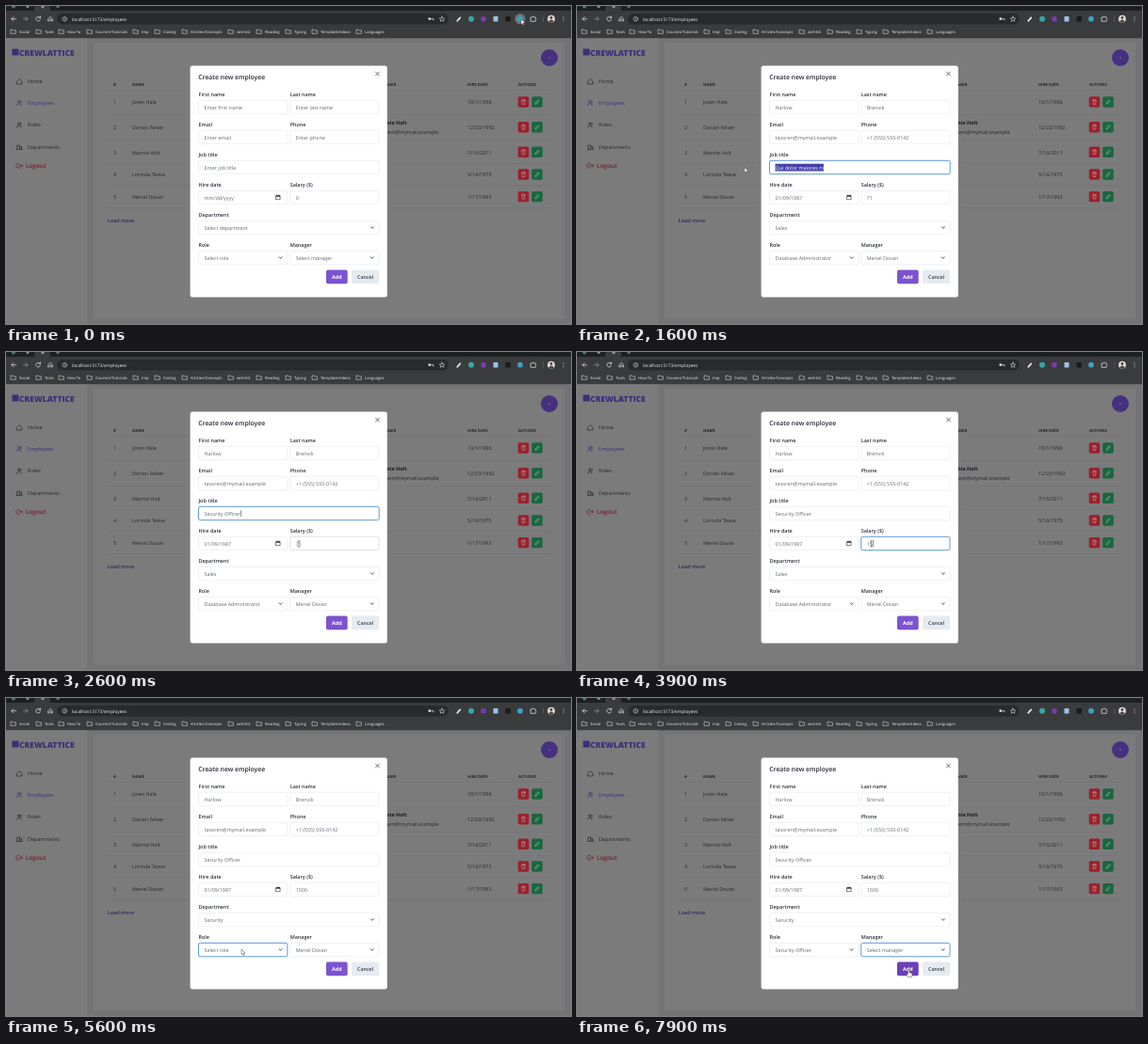
Animation, 600 px wide and 338 px high, one loop 8000 ms. Source, as an HTML page:

```html
<!DOCTYPE html>
<html lang="en">
<head>
<meta charset="utf-8">
<title>Create new employee</title>
<style>
  html, body { margin: 0; width: 100%; height: 100%; overflow: hidden; background: #777; }
  svg { display: block; width: 100vw; height: 100vh; }
  text { font-family: "Open Sans", "Noto Sans", sans-serif; text-rendering: geometricPrecision; white-space: pre; }
  .line { fill: none; stroke-linecap: round; stroke-linejoin: round; }
</style>
</head>
<body>
<svg id="stage" viewBox="0 0 600 338"></svg>
<script>
const stage = document.getElementById('stage');
const LOOP = 8000, STEP = 100;

function el(tag, attrs, parent = stage) {
  const node = document.createElementNS('http://www.w3.org/2000/svg', tag);
  for (const key in attrs) node.setAttribute(key, attrs[key]);
  return parent.appendChild(node);
}
const set = (node, attrs) => { for (const key in attrs) node.setAttribute(key, attrs[key]); };
const show = (node, on) => set(node, { visibility: on ? 'visible' : 'hidden' });
const box = (x, y, width, height, fill, rx = 0, parent) =>
  el('rect', { x, y, width, height, fill, rx }, parent);
const dot = (cx, cy, r, fill, parent) => el('circle', { cx, cy, r, fill }, parent);
const line = (d, stroke, width = 0.8, parent) =>
  el('path', { d, stroke, 'stroke-width': width, class: 'line' }, parent);
function label(x, y, str, size, fill, weight = 400, anchor = 'start', parent) {
  const node = el('text', { x, y, 'font-size': size, fill, 'font-weight': weight, 'text-anchor': anchor }, parent);
  node.textContent = str;
  return node;
}

// Browser bars
function drawBrowser() {
  const ink = '#d4d6d8';
  box(0, 0, 600, 6, '#1d2021');
  box(30, 0, 17, 6, '#3a3b3c', 2);
  dot(8, 0.5, 2, '#52777a');
  dot(23, 0.5, 1.6, '#8a9090');
  dot(39, 0.5, 1.6, '#989ba0');
  dot(55, 0.5, 1.6, '#6c7780');
  box(0, 5, 600, 29.5, '#3a3b3c');
  box(54, 8, 416, 11.5, '#282a2b', 5.7);
  line('M10.5 13.7H6M8 11.6L5.9 13.7 8 15.8', ink);
  line('M18.5 13.7H23M21 11.6L23.1 13.7 21 15.8', '#8b8e90');
  line('M36.3 12.4A2.4 2.4 0 1 0 36.4 14.6M36.6 10.9V12.7H34.8', ink);
  line('M45 13.4L47.2 11.3 49.4 13.4V16H48.1V14.1H46.3V16H45Z', ink, 0.7);
  el('circle', { cx: 62.3, cy: 13.8, r: 2.3, stroke: ink, 'stroke-width': 0.6, class: 'line' });
  line('M62.3 13.7V15M62.3 12.5V12.6', ink, 0.6);
  label(70, 15.6, 'localhost:5173/employees', 4.8, '#eceef0');
  dot(449.8, 13.7, 1.4, ink);
  line('M451 13.7H454V15', ink, 0.8);
  el('path', { d: 'M463 11L463.8 13 465.8 13.1 464.2 14.4 464.8 16.4 463 15.2 461.2 16.4 461.8 14.4 460.2 13.1 462.2 13Z',
    class: 'line', stroke: ink, 'stroke-width': 0.6 });
  line('M479.2 15.9L482.3 12.4', '#e8e8e8', 1.6);
  dot(494, 13.7, 3, '#35a8a4');
  dot(507, 13.7, 2.8, '#7d3bb0');
  box(517.5, 11, 5, 5.5, '#9cc3e6', 0.6);
  box(530.5, 11, 5.5, 5.5, '#191b1c', 0.6);
  const hover = dot(546, 13.7, 5.6, '#68757b');
  dot(546, 13.7, 2.9, '#3f9fc0');
  line('M557.5 12H559A1 1 0 0 1 561 12H562.3V13.4A1 1 0 0 1 562.3 15.2V16.3H557.5Z', ink, 0.8);
  box(570.2, 10.5, 0.5, 6.5, '#6c6e70');
  dot(579, 13.7, 3.9, '#e0dcd9');
  el('path', { d: 'M576.2 16.4Q579 12.8 581.8 16.4Q579 18.8 576.2 16.4Z', fill: '#4d4442' });
  dot(579, 12.5, 1.4, '#4d4442');
  for (const y of [11.7, 13.7, 15.7]) dot(592, y, 0.5, ink);

  const marks = [[14, 'Social'], [41, 'Tools'], [65, 'How To'], [95, 'Courses/Tutorials'], [144, 'Imp'],
    [167, 'Coding'], [196, 'Articles/Concepts'], [245, 'wishlist'], [275, 'Reading'], [306, 'Typing'],
    [334, 'Templates/Ideas'], [381, 'Languages']];
  for (const [x, name] of marks) {
    line(`M${x - 8.6} 25.1h1.7l.7 .8h2.6v3.4h-5z`, ink, 0.6);
    label(x, 28.8, name, 4.15, '#eceeef');
  }
  return hover;
}

// Dimmed page
function drawPage() {
  const ink = '#25282e', purple = '#3c2e76', red = '#7b1b2c';
  box(0, 34.5, 600, 303.5, '#747475');
  box(0, 34.5, 86, 303.5, '#7b7b7c');
  box(93, 39, 500, 293.5, '#7b7b7c', 2);
  box(6.5, 45.5, 7, 7, purple, 0.5);
  label(14, 52.6, 'CREWLATTICE', 8.5, purple, 800);

  line('M11.6 80.2L14.2 77.6 16.8 80.2V83H11.6Z', ink, 0.7);
  for (const [y, c] of [[103, purple], [126.5, ink]]) {
    el('circle', { cx: 13.7, cy: y - 1.4, r: 1.3, stroke: c, 'stroke-width': 0.7, class: 'line' });
    line(`M11.4 ${y + 2.6}Q11.6 ${y + 0.6} 13.7 ${y + 0.6}T16 ${y + 2.6}M16 ${y - 2}q1.4 .8 0 1.8`, c, 0.7);
  }
  line('M11.8 152.2V148H14.6V152.2M14.6 149.5H16.7V152.2M11.3 152.3H17.2', ink, 0.7);
  line('M13.8 167.4A2.5 2.5 0 1 0 13.8 172.2M13.3 169.8H17.3M16 168.4L17.4 169.8 16 171.2', red, 0.8);
  label(23, 82, 'Home', 5.5, ink);
  label(23, 105, 'Employees', 5.5, purple);
  label(23, 128.4, 'Roles', 5.5, ink);
  label(23, 151.7, 'Departments', 5.5, ink);
  label(21, 172.2, 'Logout', 6.4, red, 600);

  dot(577, 55, 9, '#46307f');
  line('M576.2 55H577.8M577 54.2V55.8', '#857ba5', 0.5);

  const heads = [[114, '#'], [134, 'NAME'], [490, 'HIRE DATE'], [544, 'ACTIONS']];
  for (const [x, name] of heads) label(x, 84.9, name, 4.3, ink, 700);
  label(414.3, 84.9, 'MANAGER', 4.3, ink, 700, 'end');
  const rows = [[102, 'Joren Hale', '10/1/1996'], [128.7, 'Dorian Felver', '12/23/1992'],
    [155.3, 'Marnie Holt', '7/16/2011'], [179, 'Lorinda Teave', '5/16/1975'], [202.6, 'Meriel Dovan', '1/17/1993']];
  rows.forEach(([y, name, date], i) => {
    label(114, y + 2.3, i + 1, 5.4, ink);
    label(134, y + 2.3, name, 5.4, ink);
    label(490, y + 2.3, date, 5.4, ink);
    box(543.7, y - 5.7, 11.6, 11.4, '#99222c', 1.6);
    box(558.2, y - 5.7, 11.6, 11.4, '#1b6640', 1.6);
    line(`M547.6 ${y - 1.6}h3.8M548.7 ${y - 2.5}h1.6M548 ${y - 1.5}l.3 4h2.4l.3 -4`, '#c9a0a4', 0.6);
    line(`M562.2 ${y + 2}l.3 -1.3 2.7 -2.8 1 1 -2.7 2.8z`, '#a0c0af', 0.6);
  });
  for (const y of [89.5, 115.3, 142, 167.2, 190.8, 214.5]) box(107, y, 472, 0.4, '#707071');
  label(425.5, 126, 'Marnie Holt', 5.4, '#17191d', 700, 'end');
  label(459.5, 135.8, 'lem@mymail.example', 5.4, ink, 400, 'end');
  label(107.7, 229.5, 'Load more', 5.5, '#30285a', 600);
}

const L = 204.5, R = 301.7, HALF = 94.3, FULL = 191.7;
const fields = {
  first: { x: L, y: 100.2, w: HALF, name: 'First name' },
  last: { x: R, y: 100.2, w: HALF, name: 'Last name' },
  email: { x: L, y: 132.2, w: HALF, name: 'Email' },
  phone: { x: R, y: 132.2, w: HALF, name: 'Phone' },
  job: { x: L, y: 164.3, w: FULL, name: 'Job title' },
  date: { x: L, y: 196.3, w: HALF, name: 'Hire date' },
  salary: { x: R, y: 196.3, w: HALF, name: 'Salary ($)' },
  dept: { x: L, y: 228.4, w: FULL, name: 'Department', opens: [4800, 5300],
    options: ['Select department', 'Administration', 'Engineering', 'Finance', 'Human Resources',
      'Legal', 'Marketing', 'Operations', 'Sales', 'Security'] },
  role: { x: L, y: 260.4, w: HALF, name: 'Role', opens: [5700, 6100], options: ['Select role', 'Security Officer'] },
  manager: { x: R, y: 260.4, w: HALF, name: 'Manager', opens: [6700, 7100],
    options: ['Select manager', 'Marnie Holt', 'Meriel Dovan'] }
};
const FIELD_H = 14.4, OPTION_H = 8, VALUE_INK = '#62676f';

function drawModal() {
  box(195.6, 63.6, 209.2, 246, '#fff', 2.5);
  label(204.3, 77.5, 'Create new employee', 6.8, '#23272f', 600);
  line('M392.5 70L396.5 74M396.5 70L392.5 74', '#30343b', 0.7);
  for (const f of Object.values(fields)) {
    label(f.x, f.y - 4.7, f.name, 5.45, '#2b2f37', 600);
    f.rect = box(f.x, f.y, f.w, FIELD_H, '#fff', 1.8);
    f.mark = box(0, f.y + 3.4, 0, 7.8, '#4440a8');
    f.text = label(f.x + 6, f.y + 9.4, '', 5.4, VALUE_INK);
    f.caret = box(0, f.y + 3.8, 0.5, 7, '#22252a');
    if (f.options) line(`M${f.x + f.w - 8.7} ${f.y + 6.4}l1.5 1.6 1.5 -1.6`, '#3f4650', 0.9);
  }
  line('M286.9 201.7H291.1V205.7H286.9ZM287.9 200.9V201.7M290.1 200.9V201.7', '#22252a', 0.6);
  box(286.9, 201.4, 4.2, 1.2, '#22252a');
  const add = box(340, 280.6, 22.7, 14.6, '#7c53d0', 1.8);
  label(351.3, 290, 'Add', 5.4, '#fff', 700, 'middle');
  box(367, 280.6, 29.2, 14.6, '#e6ebf0', 1.8);
  label(381.6, 290, 'Cancel', 5.4, '#333f50', 600, 'middle');
  return add;
}

function drawMenus() {
  for (const f of Object.values(fields).filter(f => f.options)) {
    const top = f.y + FIELD_H + 0.4;
    f.menu = el('g', {});
    set(box(f.x, top, f.w, f.options.length * OPTION_H, '#fff', 0, f.menu), { stroke: '#8b8f96', 'stroke-width': 0.5 });
    f.items = f.options.map((name, i) => ({
      y: top + i * OPTION_H,
      back: box(f.x, top + i * OPTION_H, f.w, OPTION_H, '#1967d2', 0, f.menu),
      text: label(f.x + 4, top + i * OPTION_H + 5.9, name, 5.4, '#555', 400, 'start', f.menu)
    }));
  }
}

function drawCursors() {
  const skin = { fill: '#fff', stroke: '#333', 'stroke-width': 0.45 };
  const arrow = el('path', { d: 'M0 0V5.6L1.4 4.4 2.3 6.5 3.2 6.1 2.4 4.1H4.1Z', ...skin });
  const beam = line('M-1.1 -3H1.1M0 -3V3M-1.1 3H1.1', '#444', 0.5);
  const hand = el('path', { d: 'M0 -3.2Q.8 -3.6 1 -2.6V-.2L3.4 .4Q4.2 .8 4 2L3.4 4.6H-.4L-2.4 1.6Q-2 .8 -.6 1.8V-2.6Z', ...skin });
  return { arrow, beam, hand };
}

const extHover = drawBrowser();
drawPage();
const addButton = drawModal();
drawMenus();
const cursors = drawCursors();

// Pointer stops: time, x, y
const path = [[0, 547, 14], [300, 547, 14], [900, 330, 145], [1150, 266, 172], [1250, 263, 172], [1600, 177.8, 171.5],
  [1900, 178, 172], [2500, 311, 203.8], [2800, 311, 203.8], [3000, 318, 203.8], [3300, 306, 203.8], [3600, 312.5, 203.8],
  [4250, 312.5, 203.8], [4650, 282.5, 237], [4800, 282.5, 237], [5150, 240, 319], [5300, 240, 319],
  [5600, 250, 267], [5700, 250, 267], [5950, 240, 287], [6100, 240, 287], [6550, 368.5, 264.5],
  [6700, 368.5, 265], [6950, 332, 279], [7100, 332, 279], [7600, 352, 292], [LOOP, 352, 292]];

function pointer(t) {
  const i = path.findIndex(p => p[0] > t);
  const [t0, x0, y0] = path[i - 1], [t1, x1, y1] = path[i];
  const u = (t - t0) / (t1 - t0), k = u * u * (3 - 2 * u);
  return [x0 + (x1 - x0) * k, y0 + (y1 - y0) * k];
}

// Latest entry whose time has come
const at = (t, ...steps) => steps.filter(s => s[0] <= t).pop()[1];
const typed = (str, t, start, pace) => str.slice(0, Math.max(0, Math.floor((t - start) / pace)));

function values(t) {
  const fill = (before, after) => t < 300 ? before : after;
  return {
    first: fill('Enter first name', 'Harlow'),
    last: fill('Enter last name', 'Brenvik'),
    email: fill('Enter email', 'tavoren@mymail.example'),
    phone: fill('Enter phone', '+1 (555) 555-0142'),
    job: at(t, [0, 'Enter job title'], [300, 'Qui dolor maiores ni'], [1700, typed('Security Officer', t, 1650, 45)]),
    date: fill('mm/dd/yyyy', '01/09/1987'),
    salary: at(t, [0, '0'], [300, '71'], [3500, typed('1500', t, 3500, 170)]),
    dept: at(t, [0, 'Select department'], [300, 'Sales'], [5300, 'Security']),
    role: at(t, [0, 'Select role'], [300, 'Database Administrator'], [5300, 'Select role'], [6100, 'Security Officer']),
    manager: at(t, [0, 'Select manager'], [300, 'Meriel Dovan'], [7100, 'Select manager'])
  };
}

// Share of the text selected, growing from its right end
function selection(key, t) {
  const [start, full, end] = { job: [1200, 1500, 1700], salary: [3000, 3300, 3500] }[key] || [0, 1, 0];
  return t < start || t >= end ? 0 : Math.min(1, (t - start) / (full - start));
}

function render(t) {
  const [px, py] = pointer(t);
  const over = (x, y, w, h) => px >= x && px <= x + w && py >= y && py <= y + h;
  const focus = at(t, [0, ''], [1200, 'job'], [2800, 'salary'], [4650, 'dept'], [5600, 'role'], [6650, 'manager']);
  const vals = values(t);
  let onText = false, menuOpen = false;

  for (const key in fields) {
    const f = fields[key], active = key === focus;
    const hovered = over(f.x, f.y, f.w, FIELD_H);
    f.text.textContent = vals[key];
    set(f.rect, {
      stroke: active ? '#5a9cdb' : hovered ? '#c9cdd4' : '#e3e6eb',
      'stroke-width': active ? 1 : 0.6
    });
    const width = vals[key] ? f.text.getComputedTextLength() : 0;
    const sel = selection(key, t);
    set(f.mark, { x: f.x + 6 + width * (1 - sel), width: width * sel });
    set(f.text, { fill: sel > 0.5 ? '#fff' : VALUE_INK });
    set(f.caret, { x: f.x + 6.2 + width });
    show(f.caret, active && !f.options && !sel);
    if (!f.options) { onText = onText || hovered; continue; }

    const open = t >= f.opens[0] && t < f.opens[1];
    menuOpen = menuOpen || open;
    set(f.menu, { display: open ? 'inline' : 'none' });
    for (const item of f.items) {
      const lit = py >= item.y && py < item.y + OPTION_H;
      set(item.back, { opacity: lit ? 1 : 0 });
      set(item.text, { fill: lit ? '#fff' : '#555' });
    }
  }

  const onAdd = !menuOpen && over(340, 280.6, 22.7, 14.6);
  set(addButton, { fill: onAdd ? '#6a3fb8' : '#7c53d0' });
  show(extHover, over(540, 8, 12, 12));
  const kind = onAdd ? 'hand' : onText ? 'beam' : 'arrow';
  for (const name in cursors) {
    show(cursors[name], name === kind);
    set(cursors[name], { transform: `translate(${px} ${py})` });
  }
}

const start = performance.now();
function tick() {
  const t = (performance.now() - start) % LOOP;
  render(Math.floor(t / STEP) * STEP);
  requestAnimationFrame(tick);
}
tick();
</script>
</body>
</html>
```
